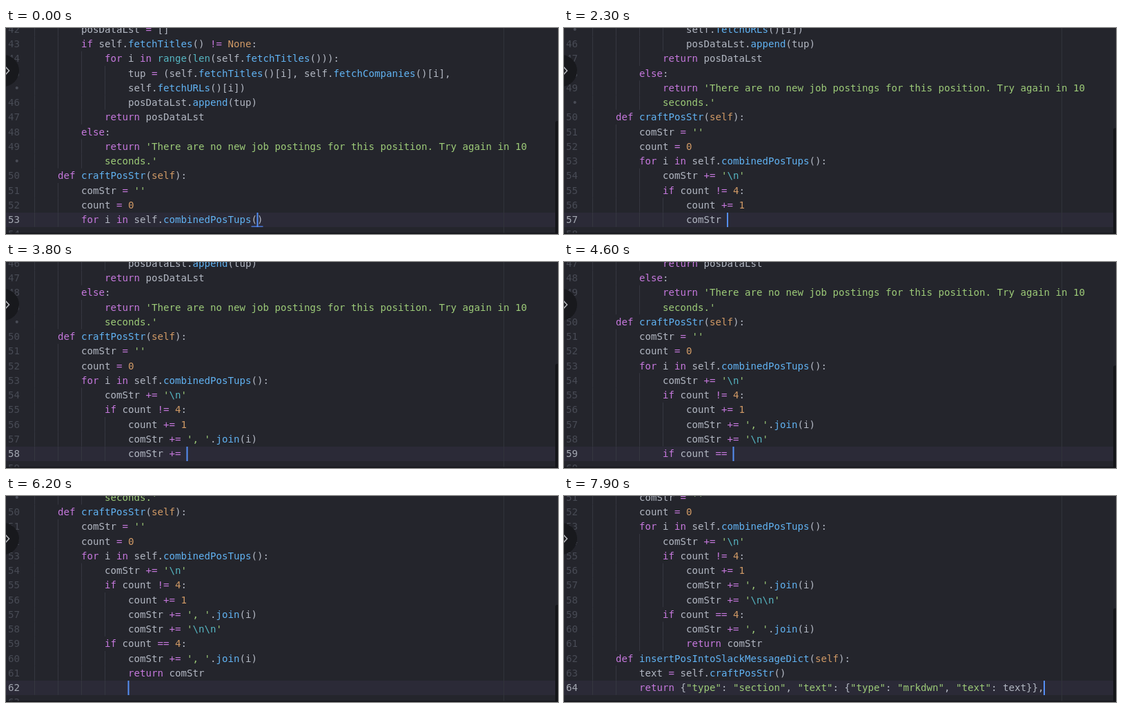
These frames come from a looping animation (800 px wide and 299 px high, 8 s). An HTML page with a canvas:

```html
<!DOCTYPE html>
<html lang="en">
<head>
<meta charset="utf-8">
<title>Typing code in an editor</title>
<style>
html, body { margin: 0; width: 100%; height: 100%; overflow: hidden; background: #24252c; }
canvas { display: block; }
</style>
</head>
<body>
<canvas id="stage" width="800" height="299"></canvas>
<script>
const ctx = document.getElementById('stage').getContext('2d');
const LOOP = 8000, STEP = 100, FIRST = 42;
const LEFT = 41, CHAR = 8.5, ROW = 21.25, ACTIVE_Y = 278;
const FG = '#b2b7c2', PURPLE = '#c678dd', BLUE = '#61b3f3', GREEN = '#9dcb78',
      ORANGE = '#d19a66', CYAN = '#56b6c2';

// ¶ marks a soft wrap
const code = String.raw`        posDataLst = []
        if self.fetchTitles() != None:
            for i in range(len(self.fetchTitles())):
                tup = (self.fetchTitles()[i], self.fetchCompanies()[i],¶self.fetchURLs()[i])
                posDataLst.append(tup)
            return posDataLst
        else:
            return 'There are no new job postings for this position. Try again in 10¶seconds.'
    def craftPosStr(self):
        comStr = ''
        count = 0
        for i in self.combinedPosTups():
            comStr += '\n'
            if count != 4:
                count += 1
                comStr += ', '.join(i)
                comStr += '\n'
            if count == 4:
                comStr += ', '.join(i)
                return comStr
    def insertPosIntoSlackMessageDict(self):
        text = self.craftPosStr()
        return {"type": "section", "text": {"type": "mrkdwn", "text": text}},`.split('\n');

// [time, line number, characters typed on it]
const keys = [[0, 53, 30], [1400, 55, 14], [2300, 57, 7], [3800, 58, 10],
              [5400, 60, 13], [6200, 62, 0], [7900, 64, 69]];
const EDIT_LINE = 58, EDIT_TIME = 5900;

const rules = [
  [/'[^']*'|"[^"]*"/y, GREEN],
  [/(?:if|for|in|return|else|def)\b|[!=+]=|=/y, PURPLE],
  [/(?:range|len)(?=\()/y, CYAN],
  [/\w+(?=\()/y, BLUE],
  [/\d+|None\b/y, ORANGE],
  [/\w+|./y, FG]
];

const indentOf = s => s.length - s.trimStart().length;

function typedBefore(line) {
  return code.slice(0, line - FIRST).reduce((n, s) => n + s.trim().length + 1, 0);
}

function cursorAt(t) {
  let k = keys.findIndex(key => key[0] > t);
  if (k < 0) k = keys.length - 1;
  const [a, b] = [keys[k - 1], keys[k]];
  const from = typedBefore(a[1]) + a[2], to = typedBefore(b[1]) + b[2];
  const p = Math.min(1, (t - a[0]) / (b[0] - a[0]));
  const pos = Math.round(from + (to - from) * p);
  let line = a[1];
  while (line < b[1] && typedBefore(line + 1) <= pos) line++;
  return { line, chars: pos - typedBefore(line) };
}

// Bracket pairs, and the closers still missing
function scan(s) {
  const open = [], pairs = [];
  let quote = '';
  [...s].forEach((c, i) => {
    if (quote) { if (c === quote) quote = ''; }
    else if (c === "'" || c === '"') quote = c;
    else if ('([{'.includes(c)) open.push(i);
    else if (')]}'.includes(c)) pairs.push([open.pop(), i]);
  });
  const closers = open.reverse().map(i => ')]}'['([{'.indexOf(s[i])]).join('');
  return { pairs, rest: quote + closers };
}

function colorize(s) {
  const out = [];
  for (let i = 0; i < s.length;) {
    for (const [re, color] of rules) {
      re.lastIndex = i;
      const m = re.exec(s);
      if (!m) continue;
      const inDef = m[0] === 'self' && s.trimStart().startsWith('def');
      [...m[0]].forEach((c, j) => {
        const escaped = color === GREEN && (c === '\\' || m[0][j - 1] === '\\');
        out.push([c, escaped ? CYAN : inDef ? ORANGE : color]);
      });
      i += m[0].length;
      break;
    }
  }
  return out;
}

function box(color, x, y, w, h) {
  ctx.fillStyle = color;
  ctx.fillRect(x, y, w, h);
}

function gutter(label, y, active) {
  ctx.fillStyle = active ? '#a4a8b2' : '#484b55';
  ctx.fillText(label, label === '•' ? 11.5 : 3, y + 5);
}

function drawLine(s, number, y, active) {
  const indent = indentOf(s);
  const startRow = label => {
    gutter(label, y, active);
    for (let c = 0; c < indent; c += 4) box('#353740', LEFT + c * CHAR, y - 10.5, 1, ROW);
  };
  startRow(String(number));
  let col = 0;
  for (const [c, color] of colorize(s)) {
    if (c === '¶') {
      y += ROW;
      col = indent;
      startRow('•');
      continue;
    }
    ctx.fillStyle = color;
    ctx.fillText(c, LEFT + col++ * CHAR, y + 5);
  }
}

function drawOverlay(line) {
  ctx.fillStyle = '#18191d';
  ctx.beginPath();
  ctx.arc(-4, 62, 23, 0, 7);
  ctx.fill();
  ctx.strokeStyle = '#b4b6bb';
  ctx.lineWidth = 1.6;
  ctx.beginPath();
  ctx.moveTo(-1, 56);
  ctx.lineTo(4.5, 62);
  ctx.lineTo(-1, 68);
  ctx.stroke();
  ctx.fillStyle = '#141519';
  ctx.beginPath();
  ctx.roundRect(796, 135 + (line - 53) * 2.55, 8, 300, 3);
  ctx.fill();
  box('#15161a', 0, 297.5, 800, 2);
}

function draw(t) {
  const { line, chars } = cursorAt(t);
  const lines = code.slice(0, line - FIRST);
  const full = code[line - FIRST], prev = lines[lines.length - 1];
  const autoIndent = indentOf(prev) + (prev.endsWith(':') ? 4 : 0);
  const before = ' '.repeat(chars ? indentOf(full) : autoIndent) + full.trim().slice(0, chars);
  const current = before + scan(before).rest;
  const col = before.length;
  if (t >= EDIT_TIME) lines[EDIT_LINE - FIRST] = lines[EDIT_LINE - FIRST].replace('\\n', '\\n\\n');

  ctx.font = '14.12px "DejaVu Sans Mono", monospace';
  box('#24252c', 0, 0, 800, 299);
  box('#2b2a37', 0, 268, 800, 21);
  box('#31333b', LEFT + 80 * CHAR, 0, 1, 299);

  let y = ACTIVE_Y;
  drawLine(current, line, y, true);
  for (let i = lines.length - 1; i >= 0 && y > 0; i--) {
    y -= ROW * lines[i].split('¶').length;
    drawLine(lines[i], FIRST + i, y, false);
  }
  if (line < 64) gutter(String(line + 1), ACTIVE_Y + ROW, false);

  const match = scan(current).pairs.find(([a, b]) => [a, a + 1, b, b + 1].includes(col));
  for (const c of match || []) box('#528bff', LEFT + c * CHAR, 287.5, CHAR, 1.2);
  box('#568ff5', LEFT + col * CHAR - 0.5, 268, 2, 21);
  drawOverlay(line);
}

const start = performance.now();
function frame() {
  const t = (performance.now() - start) % LOOP;
  draw(Math.floor(t / STEP) * STEP);
  requestAnimationFrame(frame);
}
frame();
</script>
</body>
</html>
```
